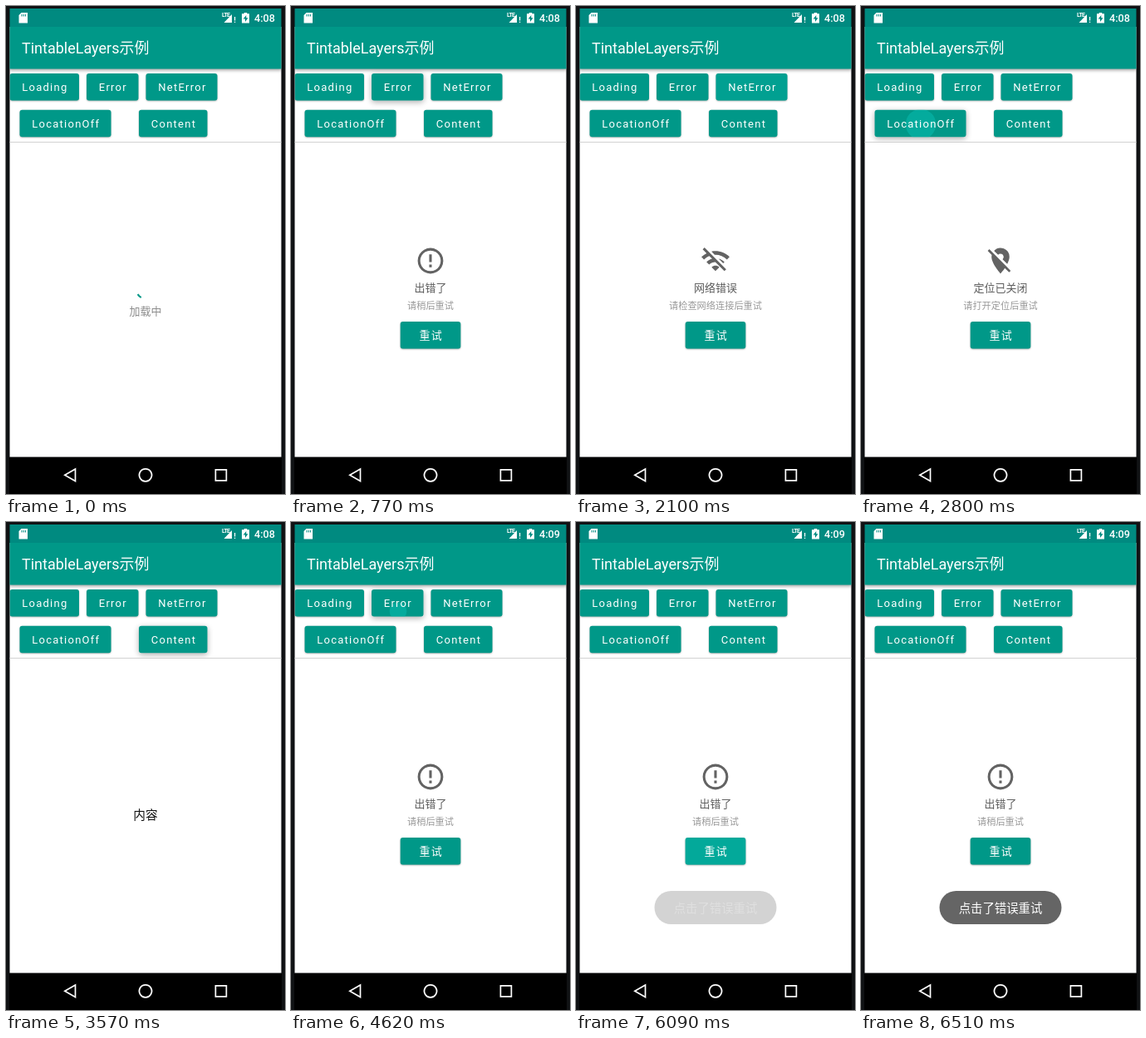
These frames come from a looping animation (336x586 px, 6790 ms). An HTML page with a canvas:

```html
<!DOCTYPE html>
<html lang="zh-CN">
<head>
<meta charset="utf-8">
<style>
html, body { margin: 0; width: 100%; height: 100%; overflow: hidden; background: #101214; }
canvas { display: block; }
</style>
</head>
<body>
<canvas id="stage" width="336" height="586"></canvas>
<script>
const ctx = document.getElementById('stage').getContext('2d');
const LOOP = 6790;
const TEAL = '#009888', GREY = '#636363';
const FONT = 'Roboto, "Noto Sans CJK SC", "Noto Sans CJK", sans-serif';

const buttons = {
  loading: { label: 'Loading', x: 4.5, y: 81, w: 83.5 },
  error: { label: 'Error', x: 97, y: 81, w: 62.5 },
  net: { label: 'NetError', x: 168.5, y: 81, w: 86 },
  location: { label: 'LocationOff', x: 16.5, y: 124.7, w: 110 },
  content: { label: 'Content', x: 160, y: 124.7, w: 82.5 },
  retry: { label: '重试', x: 131.7, y: 379, w: 72.6, pad: 22.8 }
};

const taps = [
  { at: 770, on: 'error', x: 128, y: 98 },
  { at: 1610, on: 'net', x: 211, y: 100 },
  { at: 2590, on: 'location', x: 72, y: 142 },
  { at: 3570, on: 'content', x: 201, y: 142 },
  { at: 4410, on: 'error', x: 129, y: 107 },
  { at: 5700, on: 'retry', x: 168, y: 396 }
];

const failures = {
  error: {
    title: '出错了', hint: '请稍后重试',
    icon: 'M12 2a10 10 0 1 0 .01 0zM12 4a8 8 0 1 1-.01 0zM11 7h2v6h-2zM11 15h2v2h-2z'
  },
  net: {
    title: '网络错误', hint: '请检查网络连接后重试',
    icon: 'M23 9C19.15 5.16 13.8 3.76 8.84 4.78l2.52 2.52c3.47-.17 6.99 1.05 9.63 3.7z' +
      'M19 13c-1.29-1.29-2.84-2.13-4.49-2.56l3.53 3.53zM9 17l3 3 3-3c-1.65-1.66-4.34-1.66-6 0z' +
      'M3.41 1.64L2 3.05 5.05 6.1C3.59 6.83 2.22 7.79 1 9l2 2c1.23-1.23 2.65-2.16 4.17-2.78' +
      'l2.24 2.24C7.79 10.89 6.27 11.74 5 13l2 2c1.35-1.35 3.11-2.04 4.89-2.06l7.08 7.08 1.41-1.41z'
  },
  location: {
    title: '定位已关闭', hint: '请打开定位后重试',
    icon: 'M12 6.5a2.5 2.5 0 0 1 1.67 4.35l3.63 3.63C18.28 12.62 19 10.68 19 9A7 7 0 0 0 6.96 4.15' +
      'l3.19 3.19A2.5 2.5 0 0 1 12 6.5zM16.37 16.1L3.27 3 2 4.27l3.18 3.18C5.07 7.95 5 8.47 5 9' +
      'c0 5.25 7 13 7 13s1.67-1.85 3.38-4.35L18.73 21 20 19.73z'
  }
};

const ramp = (t, from, to) => Math.min(1, Math.max(0, (t - from) / (to - from)));

// Standard material easing: cubic-bezier(.4, 0, .2, 1)
function ease(p) {
  let lo = 0, hi = 1;
  for (let i = 0; i < 20; i++) {
    const s = (lo + hi) / 2;
    if (1.2 * s * (1 - s) ** 2 + 0.6 * s * s * (1 - s) + s ** 3 < p) lo = s; else hi = s;
  }
  return lo * lo * (3 - 2 * lo);
}

function rect(color, x, y, w, h) {
  ctx.fillStyle = color;
  ctx.fillRect(x, y, w, h);
}

function text(str, x, y, size, color, { align = 'left', spacing = 0, weight = 400 } = {}) {
  ctx.font = `${weight} ${size}px ${FONT}`;
  ctx.letterSpacing = spacing + 'px';
  ctx.textAlign = align;
  ctx.fillStyle = color;
  ctx.fillText(str, x, y);
}

function shape(d, color, stroke) {
  const path = new Path2D(d);
  if (stroke) {
    ctx.strokeStyle = color;
    ctx.lineWidth = stroke;
    ctx.stroke(path);
  } else {
    ctx.fillStyle = color;
    ctx.fill(path, 'evenodd');
  }
}

function withShadow(alpha, blur, dy, draw) {
  ctx.save();
  ctx.shadowColor = `rgba(0,0,0,${alpha})`;
  ctx.shadowBlur = blur;
  ctx.shadowOffsetY = dy;
  draw();
  ctx.restore();
}

function button(name, t) {
  const { label, x, y, w, pad = 14.8 } = buttons[name];
  const tap = taps.find(p => p.on === name && t >= p.at && t < p.at + 700);
  const age = tap ? t - tap.at : 0;
  const lift = tap ? 1 - ramp(age, 240, 340) : 0;
  ctx.beginPath();
  ctx.roundRect(x, y, w, 32.5, 3);
  ctx.fillStyle = TEAL;
  withShadow(0.32, 2 + 5 * lift, 0.8 + 1.2 * lift, () => ctx.fill());
  if (tap) {
    ctx.save();
    ctx.clip();
    ctx.globalAlpha = 0.5 * (1 - ramp(age, 350, 580));
    ctx.fillStyle = '#08c0b4';
    ctx.beginPath();
    ctx.arc(tap.x, tap.y, w * 1.1 * ramp(age, 160, 340) ** 1.5, 0, 7);
    ctx.fill();
    ctx.restore();
  }
  text(label, x + pad, y + 21, 13, '#fff', { spacing: 1.25 });
}

function statusBar(t) {
  rect('#008a80', 4, 3, 328, 22);
  shape('M18.5 8H26V20.5H15.5V11zM18.5 10h1v2.5h-1zM20.7 10h1v2.5h-1zM22.9 10h1v2.5h-1z', '#fff');
  text('LTE', 260, 13, 7, '#fff', { weight: 700, spacing: -0.7 });
  shape('M272 10V20H262.5zM275 13h1.2v4.5H275zM275 18.7h1.2V20H275z', '#fff');
  shape('M284 9.3h2.7V8h3.6v1.3H293V20.5H284zM289.3 11l-3.6 4.4h2.3v3.6l3.5-4.7h-2.2z', '#fff');
  text(t < 4410 ? '4:08' : '4:09', 299, 19, 12.7, '#fff', { weight: 500 });
}

function loading(t) {
  const phase = t % 1333 / 1333;
  const tail = 118 + 0.2295 * t + 270 * ease(ramp(phase, 0.5, 1));
  const head = 118 + 0.2295 * t + 270 * ease(ramp(phase, 0, 0.5)) + 30;
  ctx.beginPath();
  ctx.arc(168, 340.3, 11, tail * Math.PI / 180, head * Math.PI / 180);
  ctx.strokeStyle = TEAL;
  ctx.lineWidth = 2.1;
  ctx.stroke();
  text('加载中', 168, 371, 13, '#8c8c8c', { align: 'center' });
}

function failure({ title, hint, icon }, t) {
  ctx.save();
  ctx.translate(149.5, 287.5);
  ctx.scale(1.54, 1.54);
  shape(icon, GREY);
  ctx.restore();
  text(title, 168, 343, 13, '#5c5c5c', { align: 'center' });
  text(hint, 168, 363.5, 11.2, '#999', { align: 'center' });
  button('retry', t);
}

function toast(t) {
  ctx.save();
  ctx.globalAlpha = ramp(t, 5950, 6450);
  ctx.beginPath();
  ctx.roundRect(94.5, 443, 147, 40, 20);
  ctx.fillStyle = '#656565';
  ctx.fill();
  text('点击了错误重试', 168, 468.5, 14.4, '#fff', { align: 'center' });
  ctx.restore();
}

function draw(t) {
  rect('#101214', 0, 0, 336, 586);
  ctx.save();
  ctx.beginPath();
  ctx.rect(4.5, 3, 327, 538.5);
  ctx.clip();
  rect('#fff', 4, 25, 328, 517);
  withShadow(0.4, 4, 1.5, () => rect(TEAL, 4, 25, 328, 50.5));
  statusBar(t);
  text('TintableLayers示例', 19, 56.5, 18, '#fff');
  for (const name in buttons) if (name !== 'retry') button(name, t);
  rect('#d2d2d2', 4, 163, 328, 1);

  const last = taps.filter(p => p.on !== 'retry' && p.at <= t).pop();
  const state = last ? last.on : 'loading';
  if (state === 'loading') loading(t);
  else if (state === 'content') text('内容', 168, 357, 14.7, '#111', { align: 'center' });
  else failure(failures[state], t);
  toast(t);
  ctx.restore();

  rect('#000', 4, 542, 328, 44);
  shape('M83.5 556V570.5L70.8 563.2z', '#fff', 1.7);
  shape('M168 555.8a7.5 7.5 0 1 0 .01 0z', '#fff', 1.8);
  shape('M252.4 556.8h13v13h-13z', '#fff', 1.7);
}

const start = performance.now();
function tick() {
  draw((performance.now() - start) % LOOP);
  requestAnimationFrame(tick);
}
tick();
</script>
</body>
</html>
```
